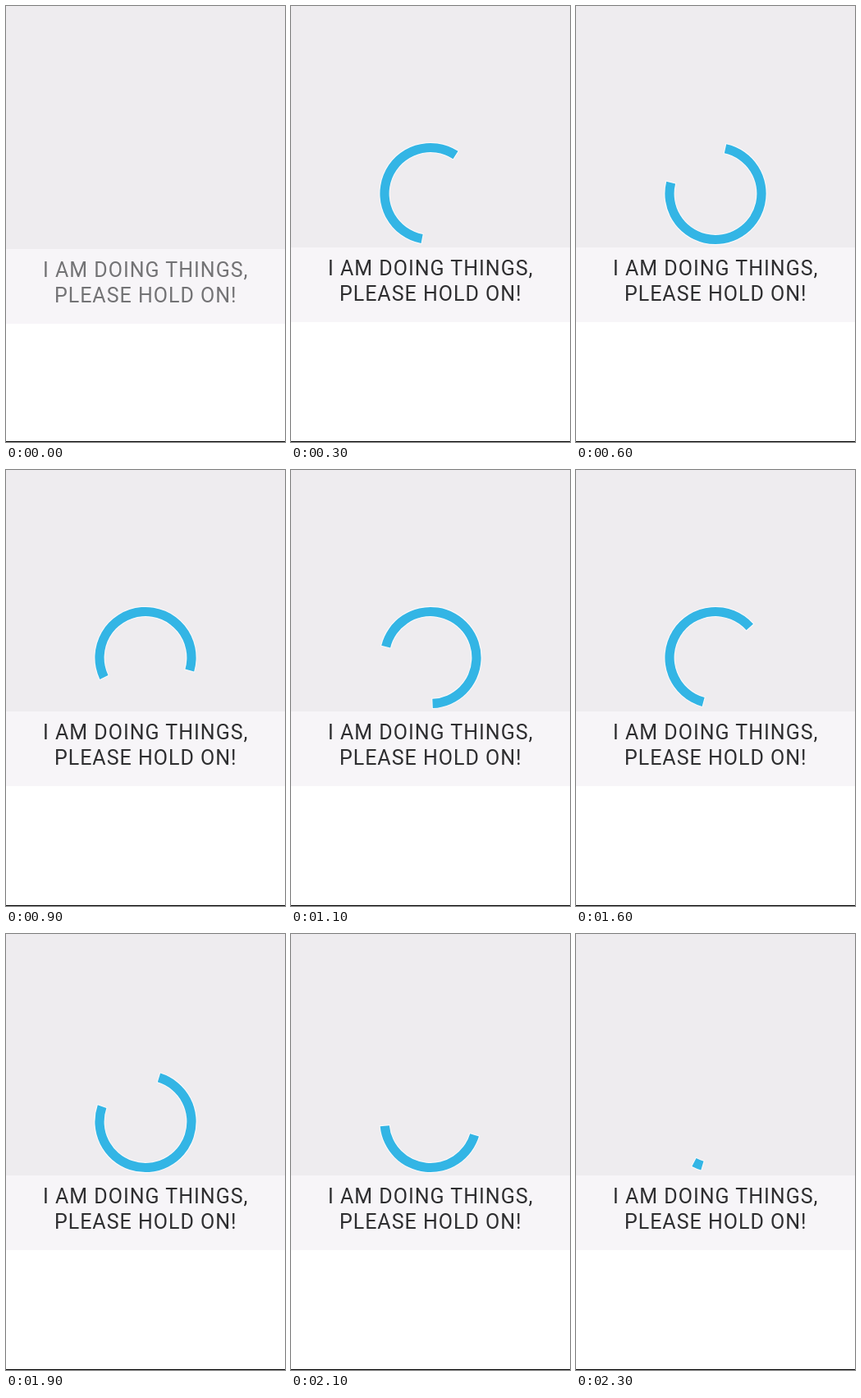
Recreate the animation shown at these times as an HTML page. Size 340 px wide and 531 px high, loop 2.4 s.

```html
<!DOCTYPE html>
<html lang="en">
<head>
<meta charset="utf-8">
<title>Loading</title>
<style>
  html, body { margin: 0; width: 100%; height: 100%; overflow: hidden; background: #fff; }
  svg { display: block; width: 340px; height: 531px; }
  text { font: 400 25px Roboto, "Open Sans", sans-serif; letter-spacing: 1px; text-anchor: middle; }
</style>
</head>
<body>
<svg viewBox="0 0 340 531">
  <rect width="340" height="531" fill="#fff"/>
  <rect width="340" height="296" fill="#eeecef"/>
  <rect y="530" width="340" height="1" fill="#000"/>
  <g id="banner">
    <rect y="294" width="340" height="91" fill="#f7f5f8"/>
    <g id="label" fill="#2e2e30">
      <text x="170.2" y="328">I AM DOING THINGS,</text>
      <text x="170.2" y="359">PLEASE HOLD ON!</text>
    </g>
  </g>
  <path id="arc" fill="#33b5e5" stroke="#fff" stroke-opacity=".75" stroke-width="2" paint-order="stroke"/>
</svg>
<script>
const LOOP = 2400, STEP = 100;
const CENTER = { x: 170, y: 228.5 }, OUTER = 61.6, INNER = 50.4;
const MIN_SWEEP = 6, GROWTH = 266, SPIN = 91.9;
const arc = document.getElementById('arc');
const banner = document.getElementById('banner');
const label = document.getElementById('label');

const ease = u => (1 - Math.cos(Math.PI * u)) / 2;

// Degrees run clockwise from the top.
function point(radius, degrees) {
  const a = degrees * Math.PI / 180;
  return `${(CENTER.x + radius * Math.sin(a)).toFixed(2)} ${(CENTER.y - radius * Math.cos(a)).toFixed(2)}`;
}

function ringSector(tail, sweep) {
  const head = tail + sweep, large = sweep > 180 ? 1 : 0;
  return `M${point(OUTER, tail)}A${OUTER} ${OUTER} 0 ${large} 1 ${point(OUTER, head)}` +
    `L${point(INNER, head)}A${INNER} ${INNER} 0 ${large} 0 ${point(INNER, tail)}Z`;
}

// The head runs ahead for half a cycle, then the tail catches up, while all of it spins.
function spinner(step) {
  const n = step - 3;
  const phase = 0.658 + 0.7715 * n;
  const cycle = Math.floor(phase / 2);
  const u = phase - 2 * cycle;
  const headGain = ease(Math.min(u, 1));
  const tailGain = ease(Math.max(u - 1, 0));
  const tail = 190.7 + SPIN * n + GROWTH * (cycle + tailGain);
  return ringSector(tail % 360, MIN_SWEEP + GROWTH * (headGain - tailGain));
}

function render(time) {
  const step = Math.floor((time % LOOP) / STEP);
  const entering = step === 0;
  arc.setAttribute('d', entering ? '' : spinner(step));
  banner.setAttribute('transform', entering ? 'translate(0 2)' : '');
  label.setAttribute('opacity', entering ? 0.65 : 1);
}

const start = performance.now();
function tick() {
  render(performance.now() - start);
  requestAnimationFrame(tick);
}
tick();
</script>
</body>
</html>
```
